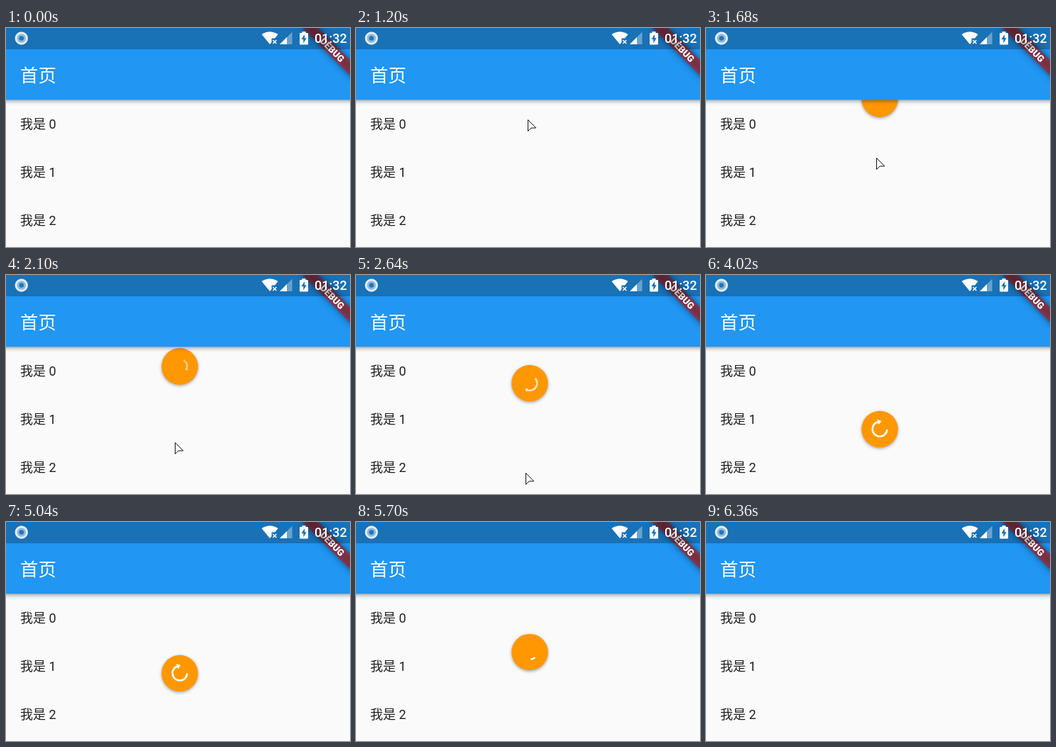
An HTML page with a canvas for the animation above (9.42 s loop, 485 px wide and 309 px high).

```html
<!DOCTYPE html>
<html lang="zh-CN">
<head>
<meta charset="utf-8">
<title>首页</title>
<style>
html, body { margin: 0; width: 100%; height: 100%; overflow: hidden; background: #fafafa; }
canvas { display: block; width: 485px; height: 309px; }
</style>
</head>
<body>
<canvas id="stage" width="485" height="309"></canvas>
<script>
const ctx = document.getElementById('stage').getContext('2d');
const W = 485, H = 309, LOOP = 9420, STEP = 60;
const DP = 1.286;            // pixels per layout unit
const BAR = 30, LIST = 101.3;
const FONT = 'Roboto, "Noto Sans CJK SC", "Noto Sans CJK", sans-serif';
const PI = Math.PI;

// Pointer path: time, x, y
const path = [
  [180, 458, 73], [240, 385, 94], [300, 292, 130], [360, 208, 164],
  [420, 175, 173], [480, 206, 158], [540, 238, 139], [839, 238, 139],
  [840, 239, 122], [900, 242, 129], [1200, 242, 129], [1380, 242, 145],
  [2100, 238, 236], [2940, 240, 303], [3060, 240, 303], [3120, 240, 309.5],
  [3420, 240, 312.7], [4020, 240, 397.5], [4380, 240, 439]
];
const RELEASE = 4969, SPIN = RELEASE + 150, DONE = SPIN + 1002, GONE = DONE + 200;

const clamp = (v, a, b) => Math.min(b, Math.max(a, v));

function pointer(t) {
  if (t < path[0][0]) return null;
  for (let i = 1; i < path.length; i++) {
    const [t0, x0, y0] = path[i - 1], [t1, x1, y1] = path[i];
    if (t <= t1) {
      const k = (t - t0) / (t1 - t0);
      return { x: x0 + (x1 - x0) * k, y: y0 + (y1 - y0) * k };
    }
  }
  return { x: 240, y: 439 };
}

// cubic-bezier(.4, 0, .2, 1)
function ease(x) {
  if (x <= 0 || x >= 1) return clamp(x, 0, 1);
  let a = 0, b = 1, m = 0.5;
  for (let i = 0; i < 24; i++) {
    m = (a + b) / 2;
    const v = 1.2 * m * (1 - m) ** 2 + 0.6 * m * m * (1 - m) + m ** 3;
    if (v < x) a = m; else b = m;
  }
  return 3 * m * m * (1 - m) + m ** 3;
}

function pull(t) {
  if (t < 1200 || t >= GONE) return 0;
  if (t < RELEASE) return clamp((pointer(t).y - 129) / 206.6, 0, 1.5);
  return 1.5 - 0.5 * clamp((t - RELEASE) / 150, 0, 1);
}

function shadow(color, blur, dy, dx = 0) {
  ctx.shadowColor = color;
  ctx.shadowBlur = blur;
  ctx.shadowOffsetX = dx;
  ctx.shadowOffsetY = dy;
}

function poly(points, fill) {
  ctx.beginPath();
  points.forEach(([x, y]) => ctx.lineTo(x, y));
  ctx.closePath();
  ctx.fillStyle = fill;
  ctx.fill();
}

function disc(x, y, r, fill) {
  ctx.beginPath();
  ctx.arc(x, y, r, 0, 2 * PI);
  ctx.fillStyle = fill;
  ctx.fill();
}

function rect(x, y, w, h, fill) {
  ctx.fillStyle = fill;
  ctx.fillRect(x, y, w, h);
}

function text(str, x, y, size, fill, weight = 400) {
  ctx.font = `${weight} ${size}px ${FONT}`;
  ctx.fillStyle = fill;
  ctx.fillText(str, x, y);
}

function drawList() {
  rect(0, 0, W, H, '#fafafa');
  for (let i = 0; i < 3; i++) text('我是 ' + i, 20, 142.4 + 68 * i, 18, 'rgba(0,0,0,.87)');
}

function drawIndicator(t) {
  const s = pull(t);
  if (!s) return;
  const spinning = t >= SPIN;
  const cycle = spinning ? 0.25 + (t - SPIN) / 1000 : s / 4;
  const step = Math.floor(cycle), u = cycle - step;
  const head = ease(u * 2), tail = ease(u * 2 - 1);
  const start = -PI / 2 + tail * 1.5 * PI + u * 1.7 * PI - step * 0.8 * PI;
  const sweep = Math.max((head - tail) * 1.5 * PI, 0.001);
  const scale = 1 - clamp((t - DONE) / 200, 0, 1);
  const r = 8 * DP, line = 2 * DP;

  ctx.save();
  ctx.beginPath();
  ctx.rect(0, LIST, W, H);
  ctx.clip();
  ctx.translate(245, LIST + (88 * s - 24) * DP);
  ctx.scale(scale, scale);
  ctx.save();
  shadow('rgba(0,0,0,.36)', 4, 1.5);
  disc(0, 0, 20 * DP, '#ff9800');
  ctx.restore();

  ctx.globalAlpha = clamp(s, 0, 1);
  ctx.strokeStyle = '#fff';
  ctx.lineWidth = line;
  ctx.lineCap = 'square';
  ctx.beginPath();
  ctx.arc(0, 0, r, start, start + sweep);
  ctx.stroke();
  if (!spinning) {
    const k = Math.min(s, 1), half = line * 1.5 * k, tip = line * 2 * k;
    ctx.rotate(start + sweep);
    poly([[r - half, 0], [r + half, 0], [r, tip]], '#fff');
  }
  ctx.restore();
}

function drawAppBar() {
  ctx.save();
  shadow('rgba(0,0,0,.4)', 6, 2);
  rect(-20, -20, W + 40, LIST + 20, '#2196f3');
  ctx.restore();
  text('首页', 20, 76.3, 25.4, '#fff');
}

function drawBanner() {
  ctx.save();
  ctx.translate(491, 0);
  ctx.rotate(PI / 4);
  const box = [-40 * DP, 28 * DP, 80 * DP, 12 * DP];
  ctx.save();
  shadow('rgba(0,0,0,.5)', 10, 0, 2000);
  // Cast the soft shadow alone; the caster lies off stage
  ctx.translate(-2000 * Math.SQRT1_2, 2000 * Math.SQRT1_2);
  rect(...box, '#000');
  ctx.restore();
  rect(...box, 'rgba(183,28,28,.627)');
  ctx.textAlign = 'center';
  text('DEBUG', 0, 34 * DP + 4.6, 13.1, '#fff', 900);
  ctx.restore();
}

function drawStatus() {
  rect(0, 0, W, BAR, 'rgba(0,0,0,.25)');

  disc(21.8, 14.5, 9.2, '#e3edf6');
  disc(21.8, 14.5, 6.3, '#8db9de');
  disc(21.8, 14.5, 3.3, '#2874b4');

  // Wi-Fi fan with a small cross
  ctx.beginPath();
  ctx.moveTo(372, 23);
  ctx.lineTo(360.5, 9);
  ctx.quadraticCurveTo(372, 1.5, 383.5, 9);
  ctx.lineTo(379, 14.5);
  ctx.lineTo(374.5, 14.5);
  ctx.lineTo(374.5, 20);
  ctx.closePath();
  ctx.fillStyle = '#fff';
  ctx.fill();
  ctx.strokeStyle = '#fff';
  ctx.lineWidth = 1.5;
  ctx.beginPath();
  ctx.moveTo(376.3, 17);
  ctx.lineTo(381.3, 22);
  ctx.moveTo(381.3, 17);
  ctx.lineTo(376.3, 22);
  ctx.stroke();

  // Cell signal
  poly([[386, 23], [403.5, 5.5], [403.5, 23]], 'rgba(255,255,255,.35)');
  poly([[386, 23], [396, 13], [396, 23]], '#fff');

  // Charging battery
  rect(417.5, 5, 5, 3, '#fff');
  ctx.beginPath();
  ctx.roundRect(414, 7, 12, 16.5, 1);
  ctx.fillStyle = '#fff';
  ctx.fill();
  poly([[421, 9], [416.5, 16], [419.3, 16], [419.3, 21.5], [423.7, 14.3], [421, 14.3]], '#1971b6');

  text('01:32', 435, 21.3, 18, '#fff', 500);
}

function drawPointer(t) {
  const p = pointer(t);
  if (!p || p.y > H) return;
  ctx.save();
  ctx.translate(Math.round(p.x) + 0.5, Math.round(p.y) + 0.5);
  poly([[0, 0], [0, 16], [4.5, 11.5], [11.3, 11.5]], '#fff');
  ctx.strokeStyle = '#111';
  ctx.lineWidth = 1;
  ctx.stroke();
  ctx.restore();
}

function frame(now) {
  const t = Math.floor((now % LOOP) / STEP) * STEP;
  drawList();
  drawIndicator(t);
  drawAppBar();
  drawBanner();
  drawStatus();
  drawPointer(t);
  requestAnimationFrame(() => frame(performance.now() - begin));
}

const begin = performance.now();
frame(0);
</script>
</body>
</html>
```
